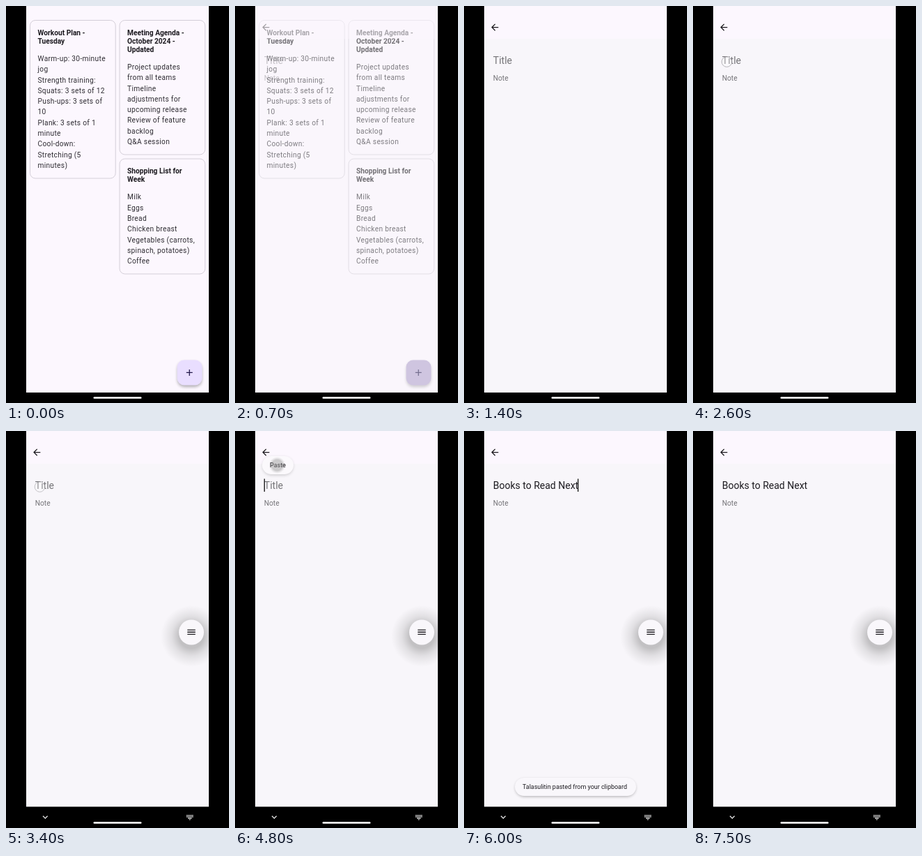
Write an HTML page that moves like this. It is 320 by 569 pixels and loops after 8000 ms.

```html
<!DOCTYPE html>
<html lang="en">
<head>
<meta charset="utf-8">
<title>Notes</title>
<style>
  html, body { margin: 0; width: 100%; height: 100%; overflow: hidden; background: #000; }
  svg { display: block; width: 100%; height: 100%; font-family: Roboto, Arial, sans-serif; }
  text { white-space: pre; }
  .head { font-size: 10.2px; font-weight: 700; fill: #1d1b20; }
  .body { font-size: 10.2px; letter-spacing: .32px; fill: #2f2d33; }
  .card { fill: none; stroke: #c9c4cf; stroke-width: .8; }
  .small { font-size: 8.95px; fill: #1d1b20; }
</style>
</head>
<body>
<svg viewBox="0 0 320 569" preserveAspectRatio="none">
  <defs>
    <clipPath id="screenClip"><rect x="29" width="262" height="554"/></clipPath>
    <clipPath id="fabClip"><rect x="245.6" y="507.6" width="35.8" height="35.8" rx="10"/></clipPath>
    <filter id="soft" x="-50%" y="-50%" width="200%" height="200%"><feGaussianBlur stdDeviation="2"/></filter>
    <radialGradient id="halo">
      <stop offset=".4" stop-color="#777" stop-opacity=".42"/>
      <stop offset=".65" stop-color="#888" stop-opacity=".2"/>
      <stop offset="1" stop-color="#999" stop-opacity="0"/>
    </radialGradient>
    <radialGradient id="press">
      <stop offset="0" stop-color="#aaa" stop-opacity=".55"/>
      <stop offset=".65" stop-color="#999" stop-opacity=".5"/>
      <stop offset="1" stop-color="#bbb" stop-opacity="0"/>
    </radialGradient>
  </defs>
  <rect width="320" height="569"/>
  <g clip-path="url(#screenClip)">
    <rect x="29" width="262" height="554" fill="#f8f6fa"/>

    <g id="home">
      <rect x="29" width="262" height="554" fill="#fcf7fe"/>
      <g id="cards"></g>
      <rect x="246" y="510" width="35" height="36" rx="10" fill="#000" opacity=".3" filter="url(#soft)"/>
      <rect x="245.6" y="507.6" width="35.8" height="35.8" rx="10" fill="#e9deff"/>
      <circle id="ripple" cx="263.5" cy="525.5" fill="#3a2560" clip-path="url(#fabClip)"/>
      <path transform="translate(255.6 517.8) scale(.637)" fill="#21174a" d="M19 13h-6v6h-2v-6H5v-2h6V5h2v6h6z"/>
    </g>

    <g id="editor">
      <rect x="29" width="262" height="47" fill="#fcf7fe"/>
      <path transform="translate(36.6 22.9) scale(.637)" fill="#1d1b20" d="M20 11H7.83l5.59-5.59L12 4l-8 8 8 8 1.41-1.41L7.83 13H20z"/>
      <text id="title" x="41.8" y="82.8" font-size="14"></text>
      <text x="41.8" y="106.8" font-size="10.2" fill="#757478">Note</text>
    </g>
    <circle id="touch" cx="48.5" cy="80" r="7.3" fill="#fff" fill-opacity=".35" stroke="#a5a4a8"/>
    <rect id="caret" y="68.5" width="1.3" height="18.5" fill="#111"/>

    <g id="bubble">
      <circle cy="294" r="44" fill="url(#halo)"/>
      <circle cy="288.5" r="18" fill="#f9f7fb"/>
      <path transform="translate(-7.64 280.6) scale(.637)" fill="#1d1b20" d="M3 18h18v-2H3zM3 13h18v-2H3zM3 6v2h18V6z"/>
    </g>

    <g id="popup">
      <rect x="39.5" y="37.5" width="44" height="26" rx="13" fill="#000" opacity=".17" filter="url(#soft)"/>
      <rect x="39" y="36" width="45" height="26" rx="13" fill="#fbf9fc"/>
      <text class="small" x="50" y="52.2" font-weight="500">Paste</text>
      <circle id="pasteTouch" cx="60.5" cy="49" r="12" fill="url(#press)"/>
    </g>

    <g id="toast">
      <rect x="74" y="499" width="172" height="25" rx="12.5" fill="#000" opacity=".3" filter="url(#soft)"/>
      <rect x="73" y="497" width="174" height="26" rx="13" fill="#f9f7fb"/>
      <text class="small" x="84" y="513">Talasulitin pasted from your clipboard</text>
    </g>
  </g>

  <g id="keyboardBar" fill="#e8e8e8">
    <rect x="29" y="538.5" width="262" height="31" fill="#000"/>
    <path d="M53 551.8l3.3 3.3 3.3-3.3" fill="none" stroke="#e8e8e8" stroke-width="1.3"/>
    <path d="M259 553h9.6M259 551h9.6" stroke="#e8e8e8" stroke-width="1.4" stroke-dasharray="1.4 .65"/>
    <rect x="261" y="554.4" width="5.6" height="1.3"/>
    <path d="M262.4 556.6h2.8l-1.4 1.4z"/>
  </g>
  <rect x="125.5" y="560.3" width="69" height="2.4" rx="1.2" fill="#fff"/>
</svg>
<script>
const LOOP = 8000, STEP = 100;
const el = id => document.getElementById(id);
const ramp = (t, from, to) => Math.min(1, Math.max(0, (t - from) / (to - from)));
const within = (t, from, to) => t >= from && t < to;
const fade = (id, value) => el(id).setAttribute('opacity', value);

const notes = [
  { x: 34.5, y: 20.5, h: 226.5, head: ['Workout Plan -', 'Tuesday'],
    body: ['Warm-up: 30-minute', 'jog', 'Strength training:', 'Squats: 3 sets of 12', 'Push-ups: 3 sets of',
      '10', 'Plank: 3 sets of 1', 'minute', 'Cool-down:', 'Stretching (5', 'minutes)'] },
  { x: 163, y: 20.5, h: 192.5, head: ['Meeting Agenda -', 'October 2024 -', 'Updated'],
    body: ['Project updates', 'from all teams', 'Timeline', 'adjustments for', 'upcoming release',
      'Review of feature', 'backlog', 'Q&amp;A session'] },
  { x: 163, y: 219, h: 165, head: ['Shopping List for', 'Week'],
    body: ['Milk', 'Eggs', 'Bread', 'Chicken breast', 'Vegetables (carrots,', 'spinach, potatoes)', 'Coffee'] }
];

const lines = (list, kind, x, y, gap) =>
  list.map((s, i) => `<text class="${kind}" x="${x}" y="${y + i * gap}">${s}</text>`).join('');

el('cards').innerHTML = notes.map(({ x, y, h, head, body }) =>
  `<rect class="card" x="${x}" y="${y}" width="122.7" height="${h}" rx="7.6"/>` +
  lines(head, 'head', x + 11, y + 21, 12) +
  lines(body, 'body', x + 11, y + 34.4 + head.length * 12, 15.3)).join('');

const caretOn = [[3600, 3900], [4400, 4900], [5000, 5600], [6000, 6500], [7200, 7500]];

function render(t) {
  fade('home', 1 - ramp(t, 500, 1000));
  fade('editor', 1 - (1 - ramp(t, 500, 1400)) ** 2);
  fade('ripple', .3 * ramp(t, 100, 400));
  el('ripple').setAttribute('r', 27 * ramp(t, 100, 500));

  const pasted = t >= 5000;
  el('title').textContent = pasted ? 'Books to Read Next' : 'Title';
  el('title').setAttribute('fill', pasted ? '#1d1b20' : '#757478');
  el('caret').setAttribute('x', pasted ? 163 : 41.6);
  fade('caret', +caretOn.some(([from, to]) => within(t, from, to)));

  fade('touch', t < 3600 ? ramp(t, 2000, 2300) * (1 - .35 * ramp(t, 2400, 2800)) : 0);

  const keyboard = t >= 3400;
  fade('keyboardBar', +keyboard);
  fade('bubble', +keyboard);
  el('bubble').setAttribute('transform', `translate(${266 + 2 * ramp(t, 3500, 3700)} 0)`);

  fade('popup', ramp(t, 3800, 4000) * (1 - ramp(t, 4800, 5000)));
  fade('pasteTouch', ramp(t, 4600, 4800));
  fade('toast', ramp(t, 5000, 5500) * (1 - ramp(t, 7100, 7500)));
}

let start;
function tick(now) {
  start ??= now;
  render(Math.floor((now - start) % LOOP / STEP) * STEP);
  requestAnimationFrame(tick);
}
render(0);
requestAnimationFrame(tick);
</script>
</body>
</html>
```
